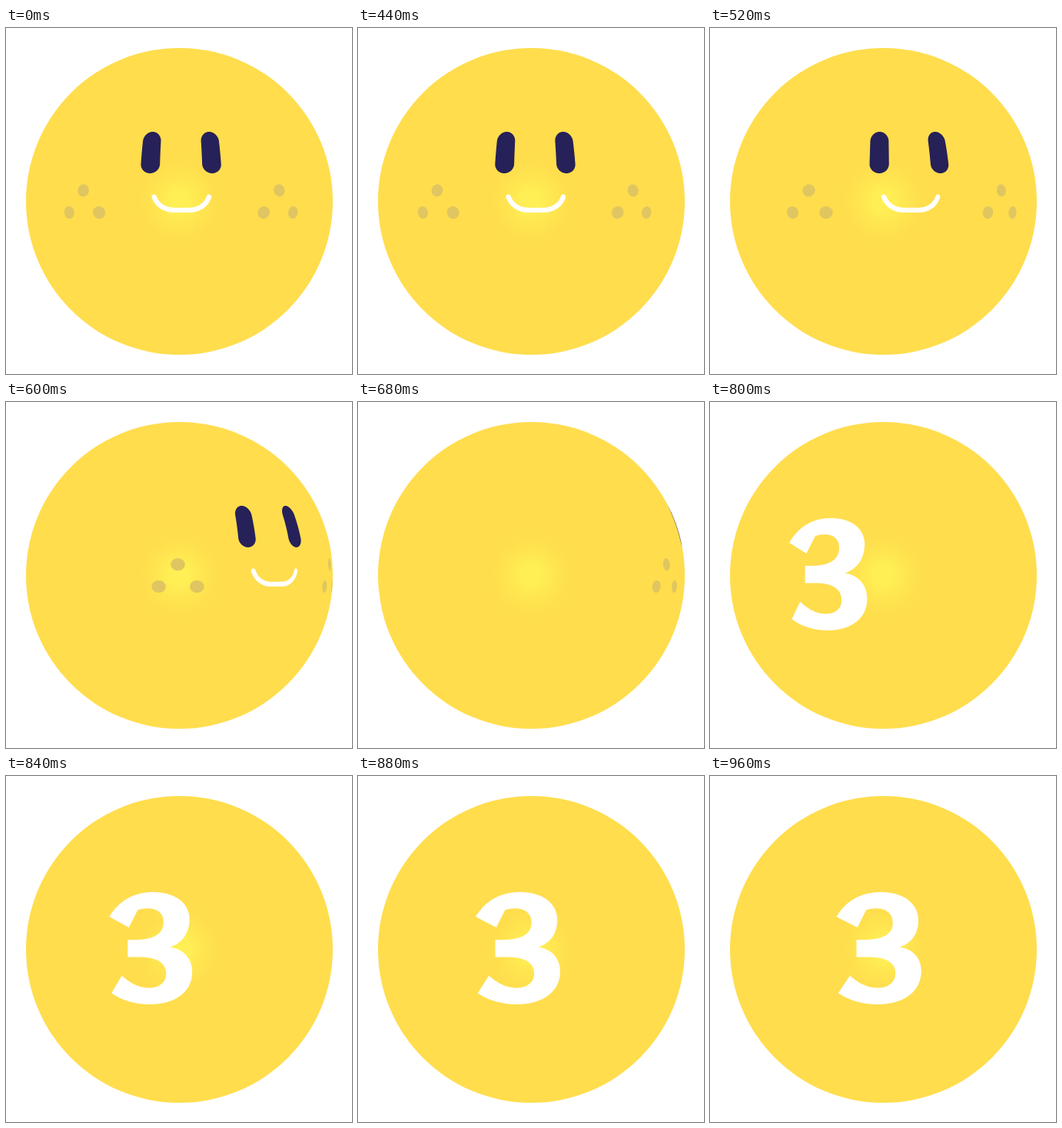
Recreate the animation shown at these times as an HTML page with a canvas. Size 450x450 px, loop 1000 ms.

```html
<!DOCTYPE html>
<html lang="en">
<head>
<meta charset="utf-8">
<title>Turning ball</title>
<style>
  html, body { margin: 0; width: 100%; height: 100%; overflow: hidden; background: #fff; }
  canvas { display: block; width: 450px; height: 450px; }
</style>
</head>
<body>
<canvas id="stage" width="450" height="450" role="img" aria-label="A smiling ball turns to show the number 3"></canvas>
<script>
const ctx = document.getElementById('stage').getContext('2d');
const C = 225.5, R = 199.5;
const LOOP = 1000, STEP = 40, HOLD = 440;
const START = 365.6, HALF = 314.4, TURN = 202, POWER = 3.3;
const rad = deg => deg * Math.PI / 180;

// Radius of the sphere's horizontal slice at height y
const slice = y => Math.sqrt(Math.max(0, R * R - (y - C) ** 2));

function sample(d, step = 0.6) {
  const path = document.createElementNS('http://www.w3.org/2000/svg', 'path');
  path.setAttribute('d', d);
  const len = path.getTotalLength(), n = Math.ceil(len / step);
  return Array.from({ length: n + 1 }, (_, i) => path.getPointAtLength(len * i / n));
}

// Shapes become lists of [longitude, y]
const unproject = pts => pts.map(p => [Math.asin((p.x - C) / slice(p.y)), p.y]);
const unroll = pts => pts.map(p => [p.x / R, p.y]);

function capsule(deg, top, bottom, rx, ry) {
  const x = rad(deg) * R;
  return unroll(sample(`M${x - rx} ${top} a${rx} ${ry} 0 0 1 ${2 * rx} 0 V${bottom}
    a${rx} ${ry} 0 0 1 ${-2 * rx} 0 Z`));
}

// Outline of a round-capped line
function ribbon(d, w) {
  const line = sample(d), n = line.length - 1;
  const dir = i => {
    const a = line[Math.max(0, i - 1)], b = line[Math.min(n, i + 1)];
    return Math.atan2(b.y - a.y, b.x - a.x);
  };
  const at = (p, a) => ({ x: p.x + w * Math.cos(a), y: p.y + w * Math.sin(a) });
  const cap = (p, a) => Array.from({ length: 13 }, (_, i) => at(p, a + Math.PI * i / 12));
  const q = Math.PI / 2;
  return [
    ...line.map((p, i) => at(p, dir(i) - q)),
    ...cap(line[n], dir(n) - q),
    ...line.map((p, i) => at(p, dir(i) + q)).reverse(),
    ...cap(line[0], dir(0) + q)
  ];
}

const freckle = (deg, y) => capsule(deg, y, y, 9.3, 8);
const freckles = [
  [-46.1, 240], [-38.9, 211.3], [-31.7, 240],
  [33.5, 240], [40.8, 211.3], [48, 240]
].map(f => freckle(...f));

const eyes = [-11.25, 12.55].map(deg => capsule(deg, 147.2, 176.8, 13, 12.2));

const mouth = unproject(ribbon(
  'M192.6 219.6 C197 231 207 236.9 220 236.9 H237 C250 236.9 260 231 264 219.6', 3.2));

const three = unproject(sample(`M164.3 183 C177 162 197 151 222 151
  C252 151 271 166 271 188 C271 205 262 217.5 246.5 222.5
  C264 225 274.7 237 274.7 254 C274.7 280 252 297 218 297
  C198 297 180 291.5 166.8 282.3 L182 259.7 C195 271 206 275.5 218 275.5
  C233 275.5 241.2 267 241.2 257 C241.2 243 230 235.5 206 235.5
  H190.5 V213 H200 C226 213 237.7 205 237.7 191
  C237.7 179 229 172.3 217 172.3 C212 172.3 207 172.8 203 174.3 L191.8 197 Z`));

const glow = ctx.createRadialGradient(C, C, 0, C, C, 62);
[[0, '#fff055'], [0.22, '#ffee54'], [0.5, '#ffe550'], [0.75, '#ffdf4e'], [1, '#ffdd4d']]
  .forEach(s => glow.addColorStop(...s));

function turn(t) {
  if (t < HOLD) return 0;
  const u = (t - START) / HALF;
  if (u >= 2) return rad(TURN);
  return rad(TURN / 2) * (u < 1 ? u ** POWER : 2 - (2 - u) ** POWER);
}

function paint(shape, angle, color) {
  const edge = Math.PI / 2;
  if (shape.every(p => Math.abs(p[0] + angle) >= edge)) return;
  ctx.beginPath();
  for (const [lon, y] of shape) {
    const a = Math.max(-edge, Math.min(edge, lon + angle));
    ctx.lineTo(C + slice(y) * Math.sin(a), y);
  }
  ctx.fillStyle = color;
  ctx.fill();
}

function draw(t) {
  const face = turn(t), digit = face - turn(960);
  ctx.fillStyle = '#fff';
  ctx.fillRect(0, 0, 450, 450);
  ctx.beginPath();
  ctx.arc(C, C, R, 0, 2 * Math.PI);
  ctx.fillStyle = glow;
  ctx.fill();
  freckles.forEach(f => paint(f, face, '#dfc660'));
  eyes.forEach(e => paint(e, face, '#262158'));
  paint(mouth, face, '#fff');
  paint(three, digit, '#fff');
}

const begin = performance.now();
function tick() {
  const t = (performance.now() - begin) % LOOP;
  draw(Math.floor(t / STEP) * STEP);
  requestAnimationFrame(tick);
}
tick();
</script>
</body>
</html>
```
